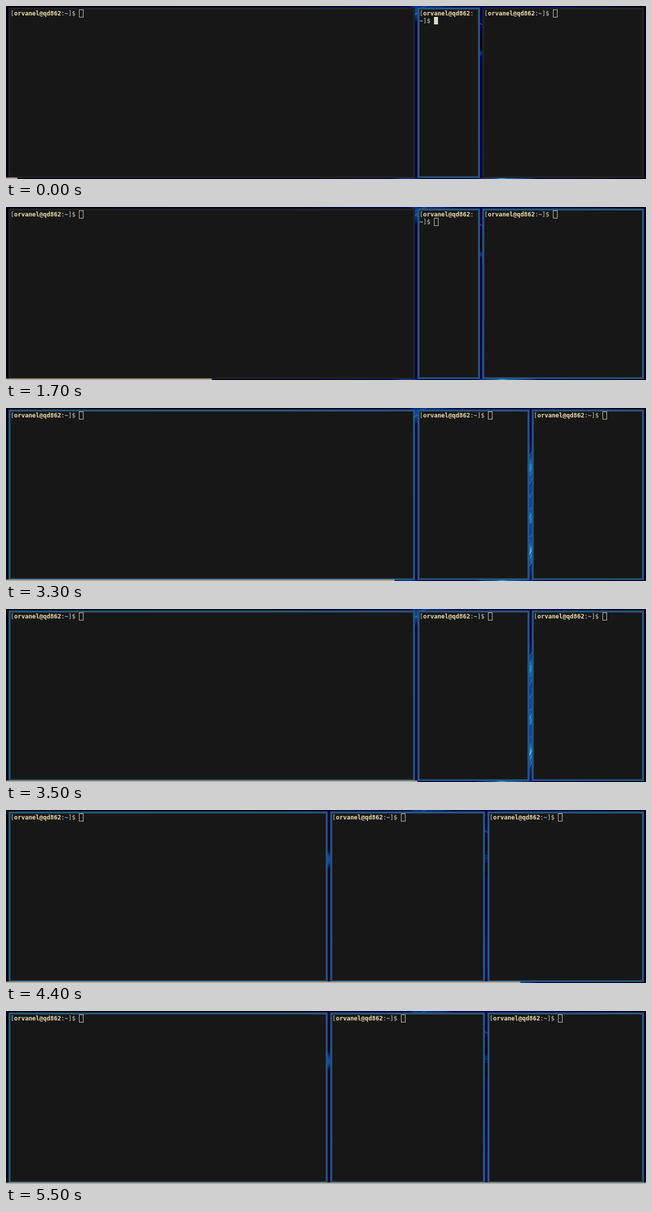
An HTML page for the animation above (5.6 s loop, 1280 by 348 pixels).

```html
<!DOCTYPE html>
<html lang="en">
<head>
<meta charset="utf-8">
<title>Tiling terminals</title>
<style>
  html, body { margin: 0; width: 100%; height: 100%; overflow: hidden; background: #000010; }
  svg { display: block; width: 1280px; height: 348px; }
  text { font: 12px "DejaVu Sans Mono", "Liberation Mono", monospace; fill: #d6d6c4; white-space: pre; }
  .user { font-weight: bold; fill: #f0dfaf; }
  .path { font-weight: bold; fill: #94bff3; }
</style>
</head>
<body>
<svg id="stage" viewBox="0 0 1280 348">
  <defs>
    <linearGradient id="night">
      <stop offset="0" stop-color="#000010"/>
      <stop offset=".46" stop-color="#00001c"/>
      <stop offset=".53" stop-color="#02023c"/>
      <stop offset=".7" stop-color="#03034c"/>
      <stop offset=".86" stop-color="#03034a"/>
      <stop offset="1" stop-color="#010118"/>
    </linearGradient>
  </defs>
  <rect width="1280" height="348" fill="url(#night)"/>
  <g id="wallpaper"></g>
  <g id="windows"></g>
  <rect id="progress" y="345" height="3" fill="#aca88f"/>
</svg>
<script>
const LOOP = 5600, STEP = 100, STEPS = LOOP / STEP;
const CHAR = 7.224, LINE = 14.6, BORDER = 4;
const FOCUSED = '#285577', IDLE = '#222222';
const USER = 'orvanel@qd862';
const stage = document.getElementById('stage');
const wallpaper = document.getElementById('wallpaper');
const progress = document.getElementById('progress');

function add(parent, tag, attrs = {}, content = '') {
  const node = document.createElementNS('http://www.w3.org/2000/svg', tag);
  set(node, attrs);
  node.textContent = content;
  parent.appendChild(node);
  return node;
}

function set(node, attrs) {
  for (const key in attrs) node.setAttribute(key, attrs[key]);
}

function glow(cx, cy, rx, ry, color) {
  const id = 'glow' + wallpaper.childElementCount;
  const gradient = add(stage.querySelector('defs'), 'radialGradient', { id });
  add(gradient, 'stop', { offset: 0.25, 'stop-color': color });
  add(gradient, 'stop', { offset: 1, 'stop-color': color, 'stop-opacity': 0 });
  add(wallpaper, 'ellipse', { cx, cy, rx, ry, fill: `url(#${id})` });
}

function streak(x1, y1, x2, y2, stroke, width = 1) {
  add(wallpaper, 'line', { x1, y1, x2, y2, stroke, 'stroke-width': width });
}

function paintWallpaper() {
  glow(955, 72, 18, 30, '#00000f');
  glow(963, 120, 10, 24, '#00000f');
  glow(820, 12, 14, 24, '#06429a');
  glow(850, 0, 55, 5, '#0a2f8c');
  glow(645, 100, 9, 20, '#0b4fb0');
  glow(950, 95, 18, 7, '#07308c');
  glow(960, 300, 14, 80, '#040c60');
  glow(1049, 215, 14, 165, '#0648b4');
  glow(1049, 120, 8, 30, '#1284dc');
  glow(1049, 220, 7, 14, '#1a9ae0');
  glow(1049, 290, 7, 28, '#1c98dc');
  glow(800, 348, 35, 5, '#0a3a9c');
  glow(1000, 348, 65, 6, '#0868b8');
  glow(992, 348, 12, 4, '#3aa4d0');
  streak(812, 20, 838, 6, '#1478d8', 2);
  streak(818, 7, 842, 0, '#0c50b4', 2);
  streak(944, 32, 966, 47, '#0f4fb4', 2);
  for (let y = 91; y < 104; y += 4) streak(956, y, 966, y, '#0b3c9c');
  for (let i = 0; i < 26; i++) {
    const y = 92 + i * 9.2;
    const rise = 7 + 4 * Math.sin(i * 2.4);
    streak(1045, y + rise, 1054, y - rise, i % 3 ? '#073a9c' : '#239ce4');
  }
  streak(1046, 296, 1052, 283, '#a8e0e0');
}

function makeWindow() {
  const group = add(document.getElementById('windows'), 'g');
  const frame = add(group, 'rect', { y: 3, height: 343 });
  const pane = add(group, 'rect', { y: 7, height: 335.5, fill: '#171717' });
  const head = add(group, 'text', { y: 19 });
  add(head, 'tspan', {}, '[');
  add(head, 'tspan', { class: 'user' }, USER);
  add(head, 'tspan', {}, ':');
  const tail = add(group, 'text');
  add(tail, 'tspan', { class: 'path' }, '~');
  add(tail, 'tspan', {}, ']$ ');
  const cursor = add(group, 'rect', { width: 8, height: 15, stroke: '#dcdccc' });

  return (left, right, color, active) => {
    const width = right - left, x = left + BORDER;
    const columns = Math.floor((width - 10) / CHAR);
    const headLength = USER.length + 2;
    const wraps = headLength + 4 > columns;
    const tailX = x + (wraps ? 0 : headLength * CHAR);
    const drop = wraps ? LINE : 0;
    set(frame, { x: left, width, fill: color });
    set(pane, { x, width: width - 2 * BORDER });
    set(head, { x });
    set(tail, { x: tailX, y: 19 + drop });
    set(cursor, {
      x: Math.round(tailX + 4 * CHAR) + 0.5,
      y: Math.floor(7 + drop + 0.5) + 0.5,
      width: active ? 7 : 8,
      height: active ? 14 : 15,
      fill: active ? '#dcdccc' : 'none'
    });
  };
}

// Window edges: left window's right, then both edges of the split.
const scenes = [
  { from: 0, edges: [818, 823, 948, 952.5], focus: [0, 1, 0], active: true },
  { from: 1000, edges: [818, 823, 948, 952.5], focus: [0, 1, 1] },
  { from: 2100, edges: [818, 823, 1047, 1051.5], focus: [0, 1, 1] },
  { from: 3000, edges: [818, 823, 1047, 1051.5], focus: [1, 1, 1] },
  { from: 4200, edges: [643.5, 648.5, 958, 963], focus: [1, 1, 1] }
];

paintWallpaper();
const windows = [makeWindow(), makeWindow(), makeWindow()];

function render(time) {
  const step = Math.floor((time % LOOP) / STEP);
  const scene = scenes.filter(s => s.from <= step * STEP).pop();
  const bounds = [5, ...scene.edges, 1276];
  windows.forEach((draw, i) => {
    const color = scene.focus[i] ? FOCUSED : IDLE;
    draw(bounds[2 * i], bounds[2 * i + 1], color, scene.active && i === 1);
  });
  set(progress, { width: 1280 * (step + 1) / STEPS });
}

const start = performance.now();
function tick() {
  render(performance.now() - start);
  requestAnimationFrame(tick);
}
tick();
</script>
</body>
</html>
```
